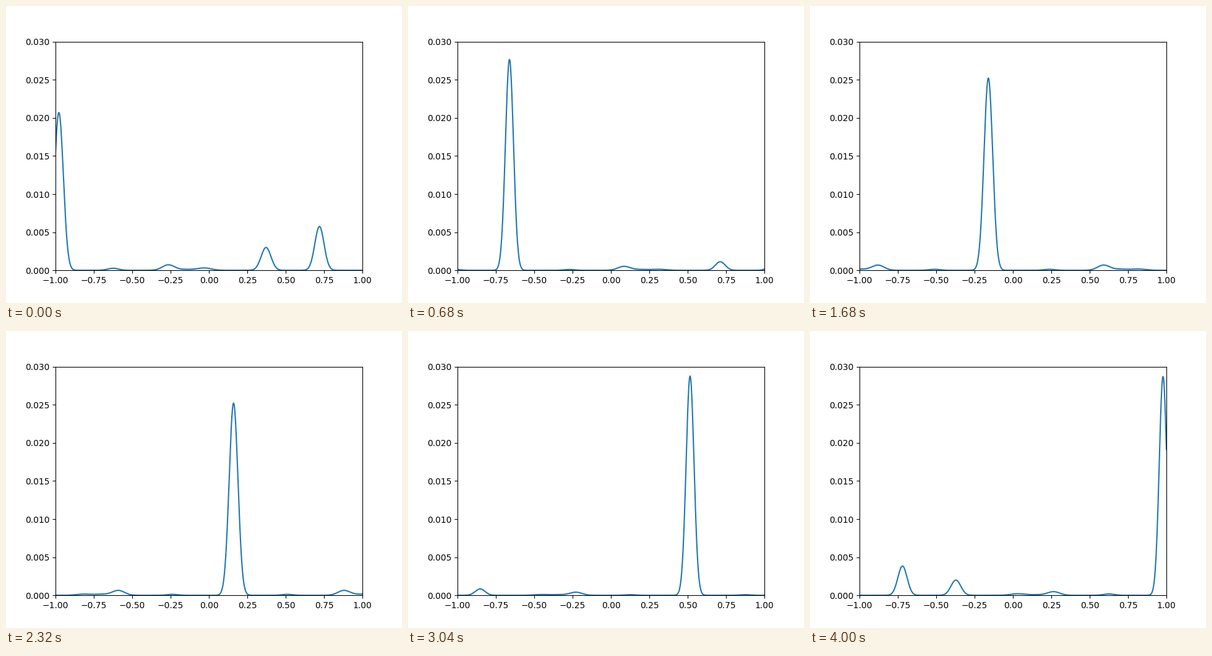
These frames come from a looping animation (640x480 px, 4.04 s). A matplotlib script:

```python
import numpy as np
import matplotlib.pyplot as plt
from matplotlib.animation import FuncAnimation

FRAMES = 101
INTERVAL = 40

# Secondary peaks on both sides: distance, width, height, growth at the edges
SIDES = [
    (0.375, 0.035, 0.9, 1.4),
    (0.735, 0.040, 4.5, 1.5),
    (0.850, 0.050, 1.0, 0.0),
    (0.970, 0.045, 1.1, 1.5),
    (1.372, 0.032, 9.0, 16.0),
    (1.720, 0.030, 6.0, 42.0),
]

x = np.linspace(-1, 1, 1000)


def bump(center, width):
    return np.exp(-0.5 * ((x - center) / width) ** 2)


def near_edge(s, scale):
    return np.exp((abs(s) - 1) / scale)


def density(i):
    s = -1 + 2 * i / (FRAMES - 1)
    middle = np.exp(-(s / 0.22) ** 2)
    edge = near_edge(s, 0.05)

    # Side peaks follow the position, leaning slightly to the middle
    y = np.zeros_like(x)
    lean = -0.026 * np.tanh(10 * s) * (1 - s * s)
    for dist, width, base, growth in SIDES:
        height = base * (1 + 0.8 * middle) + growth * near_edge(s, 0.12)
        height *= 1e-4 * (1 - 0.2 * s)
        for side in (-dist, dist):
            y += height * bump(s + side + lean * (1.4 - dist), width)

    # Main peak: pulsing height, pulled inwards at the edges
    height = 282 + 13 * np.cos(2 * np.pi * s / 0.285) - 30 * middle
    height = 1e-4 * (height + (40 * np.sign(s) - 22) * edge)
    center = s + 0.0075 * np.sin(2 * np.pi * s / 0.325)
    center -= 0.0255 * np.sign(s) * edge

    # Its width follows from a total of one
    rest = 1 - y.sum()
    width = 0.027
    for _ in range(6):
        width *= rest / (height * bump(center, width).sum())
    return y + height * bump(center, width)


fig, ax = plt.subplots(figsize=(6.4, 4.8), dpi=100)
ax.set_xlim(-1, 1)
ax.set_ylim(0, 0.03)
line, = ax.plot(x, density(0))


def update(i):
    line.set_ydata(density(i))
    return line,


anim = FuncAnimation(fig, update, frames=FRAMES, interval=INTERVAL,
                     repeat=True, repeat_delay=0)
plt.show()
```
